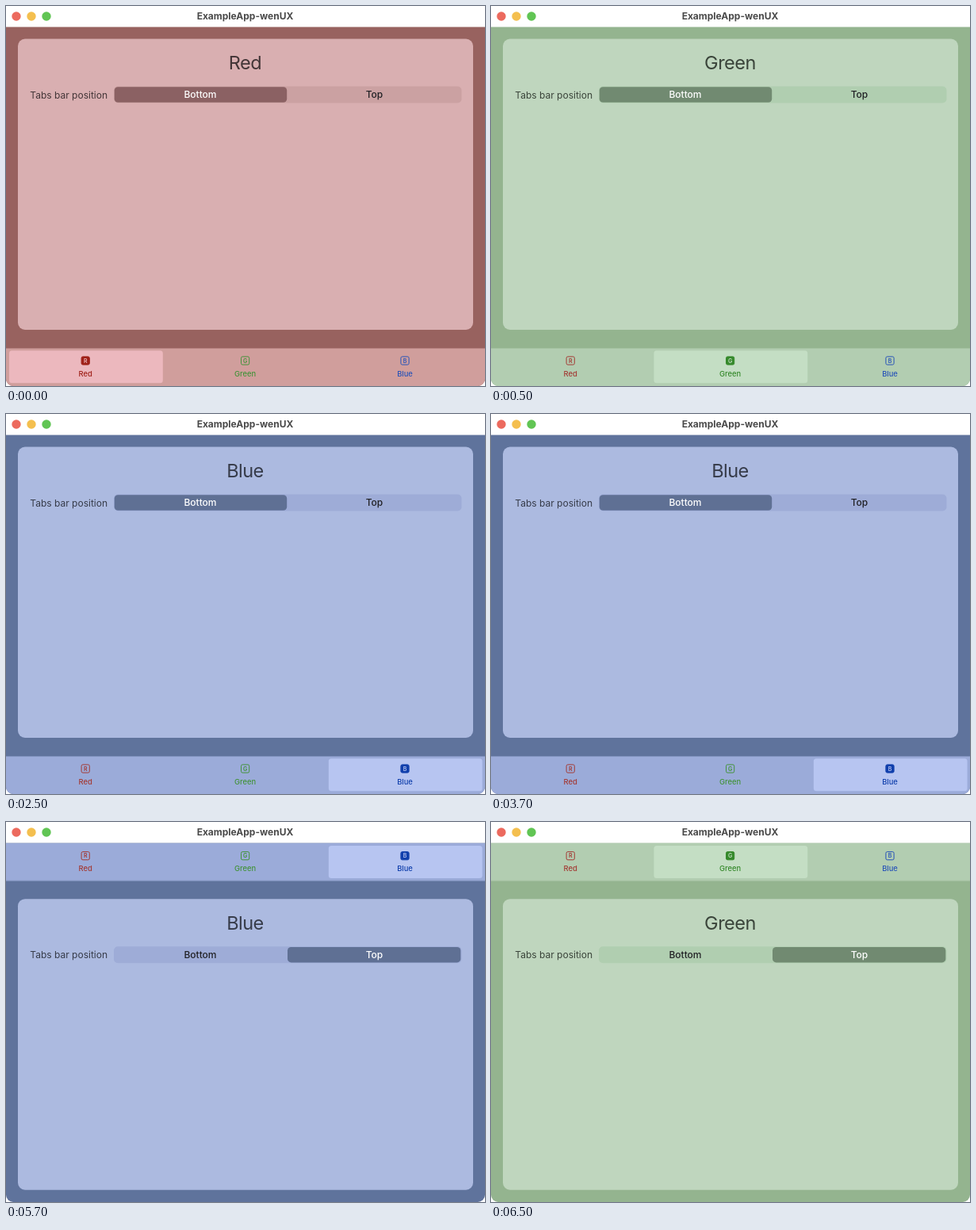
Recreate the animation shown at these times as an HTML page. Size 604 by 480 pixels, loop 8000 ms.

```html
<!DOCTYPE html>
<html lang="en">
<head>
<meta charset="utf-8">
<title>Tabs</title>
<style>
  html, body { margin: 0; width: 100%; height: 100%; overflow: hidden; background: #fff; }
  svg { display: block; width: 604px; height: 480px; }
  text { font: 12px Inter, Roboto, sans-serif; text-anchor: middle; }
  .title { font-weight: 700; fill: #4a4a4a; }
  .heading { font-size: 23.5px; letter-spacing: -.5px; }
  .segment { font-weight: 500; }
  .tab { font-size: 9.4px; font-weight: 500; }
  .letter { font-size: 7px; font-weight: 600; }
</style>
</head>
<body>
<svg id="stage" viewBox="0 0 604 480"></svg>
<script>
const LOOP = 8000;
const TABS = [
  { name: 'Red', ink: '#a33a34', active: '#9f2018', text: '#433537', back: '#98625f', panel: '#d9afb1',
    track: '#cba1a2', segment: '#8b6163', bar: '#d09e9c', chosen: '#ecb8be' },
  { name: 'Green', ink: '#43933a', active: '#35892b', text: '#3a443a', back: '#94b48f', panel: '#bfd6be',
    track: '#b0ceb0', segment: '#718a71', bar: '#b2cdb1', chosen: '#c4dec4' },
  { name: 'Blue', ink: '#2753b8', active: '#103fac', text: '#363b49', back: '#5f739c', panel: '#acbae0',
    track: '#9eacd7', segment: '#5f7094', bar: '#9babd9', chosen: '#b7c5f1' }
];
// Start time, selected tab, bar on top
const STATES = [[0, 0, 0], [500, 1, 0], [2500, 2, 0], [4500, 2, 1], [6500, 1, 1]];

const rect = (x, y, w, h, r, fill, extra = '') =>
  `<rect x="${x}" y="${y}" width="${w}" height="${h}" rx="${r}" fill="${fill}" ${extra}/>`;
const text = (x, y, kind, fill, s) => `<text x="${x}" y="${y}" class="${kind}" fill="${fill}">${s}</text>`;
const group = (dy, body) => `<g transform="translate(0 ${dy})">${body}</g>`;

function titleBar() {
  const dots = ['#ec6a5e', '#f4bf4f', '#61c554']
    .map((c, i) => `<circle cx="${13 + 19 * i}" cy="13" r="5.7" fill="${c}"/>`).join('');
  return rect(0, 0, 604, 26.5, 0, '#fff') + dots + text(301.5, 17.3, 'title', '#4a4a4a', 'ExampleApp-wenUX');
}

function panel(theme, onTop) {
  const label = (x, s, on) => text(x, 116, 'segment', on ? '#fff' : '#202024', s);
  return rect(15, 41.5, 574, 367.5, 9, theme.panel) +
    text(301.5, 80.3, 'heading', theme.text, theme.name) +
    text(79.2, 116.6, '', theme.text, 'Tabs bar position') +
    rect(136, 101.5, 438.5, 21, 5, theme.track) +
    rect(onTop ? 355 : 136.7, 102.3, onTop ? 218.3 : 217.5, 19.4, 4.5, theme.segment) +
    label(245, 'Bottom', !onTop) + label(464.5, 'Top', onTop);
}

function tabBar(theme, selected, onTop) {
  const tabs = TABS.map((tab, i) => {
    const x = 100.2 + 201.4 * i, on = i === selected, color = on ? tab.active : tab.ink;
    return (on ? rect(x - 96.2, 435.3, 193.8, 41, 3.5, theme.chosen) : '') +
      rect(x - 5.1, 442.9, 10.2, 10.2, 1.8, on ? color : 'none', `stroke="${color}"`) +
      text(x, 450.6, 'letter', on ? theme.chosen : color, tab.name[0]) +
      text(x, 467.7, 'tab', color, tab.name);
  }).join('');
  const line = rect(0, onTop ? 479 : 432, 604, 1, 0, theme.back, 'opacity=".45"');
  return rect(0, 432, 604, 48, 0, theme.bar) + line + tabs;
}

function render([, selected, onTop]) {
  const theme = TABS[selected];
  stage.innerHTML =
    `<clipPath id="frame"><rect y="-20" width="604" height="500" rx="9"/></clipPath>
     <g clip-path="url(#frame)">` +
    rect(0, 0, 604, 480, 0, theme.back) +
    group(onTop ? 55.7 : 0, panel(theme, onTop)) +
    group(onTop ? -405.3 : 0, tabBar(theme, selected, onTop)) +
    titleBar() + '</g>';
}

const stage = document.getElementById('stage');
const start = performance.now();
let shown;
function tick() {
  const t = (performance.now() - start) % LOOP;
  const state = STATES.findLast(s => s[0] <= t);
  if (state !== shown) render(shown = state);
  requestAnimationFrame(tick);
}
tick();
</script>
</body>
</html>
```
